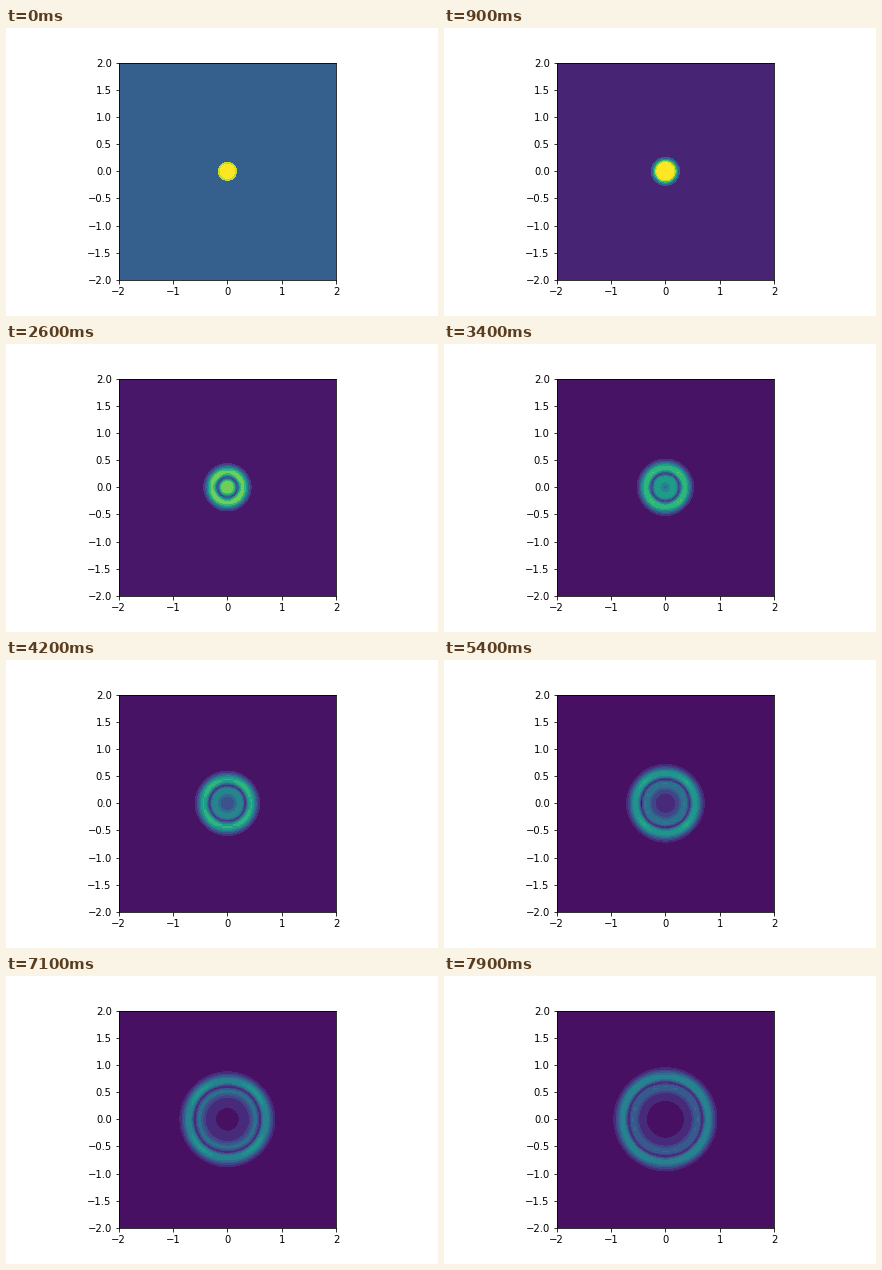
Write a matplotlib script that moves like this. It is 432 px wide and 288 px high and loops after 8 s.

```python
import numpy as np
import matplotlib.pyplot as plt
from matplotlib.animation import FuncAnimation

FRAMES = 80
INTERVAL = 100     # ms
SPEED = 0.0096     # distance travelled per frame
SIGMA = 0.085      # width of the initial pulse
SUBSTEPS = 2

axis = np.linspace(-2, 2, 101)
X, Y = np.meshgrid(axis, axis)
COURANT2 = (SPEED / SUBSTEPS / (axis[1] - axis[0])) ** 2


def laplacian(u):
    lap = np.zeros_like(u)
    lap[1:-1, 1:-1] = (u[2:, 1:-1] + u[:-2, 1:-1] + u[1:-1, 2:]
                       + u[1:-1, :-2] - 4 * u[1:-1, 1:-1])
    return lap


def simulate():
    """Amplitude |u| of a Gaussian pulse released from rest, per frame."""
    prev = np.exp(-(X**2 + Y**2) / (2 * SIGMA**2))
    u = prev + 0.5 * COURANT2 * laplacian(prev)
    fields = [np.abs(prev), np.abs(u)]
    while len(fields) < FRAMES:
        for _ in range(SUBSTEPS):
            prev, u = u, 2 * u - prev + COURANT2 * laplacian(u)
        fields.append(np.abs(u))
    return fields


fields = simulate()

plt.rcParams.update({"font.family": "DejaVu Sans", "font.size": 10})
fig, ax = plt.subplots(figsize=(6, 4), dpi=72)
fig.subplots_adjust(left=0.125, right=0.9, bottom=0.125, top=0.88)


def draw(i):
    ax.clear()
    ax.contourf(X, Y, fields[i], vmin=0, vmax=0.25, cmap="viridis")
    ax.set(xlim=(-2, 2), ylim=(-2, 2), aspect="equal",
           xticks=np.arange(-2, 3), yticks=np.arange(-2, 2.5, 0.5))
    return []


anim = FuncAnimation(fig, draw, frames=FRAMES, init_func=lambda: draw(0),
                     interval=INTERVAL, repeat=True, repeat_delay=0, blit=False)
plt.show()
```
